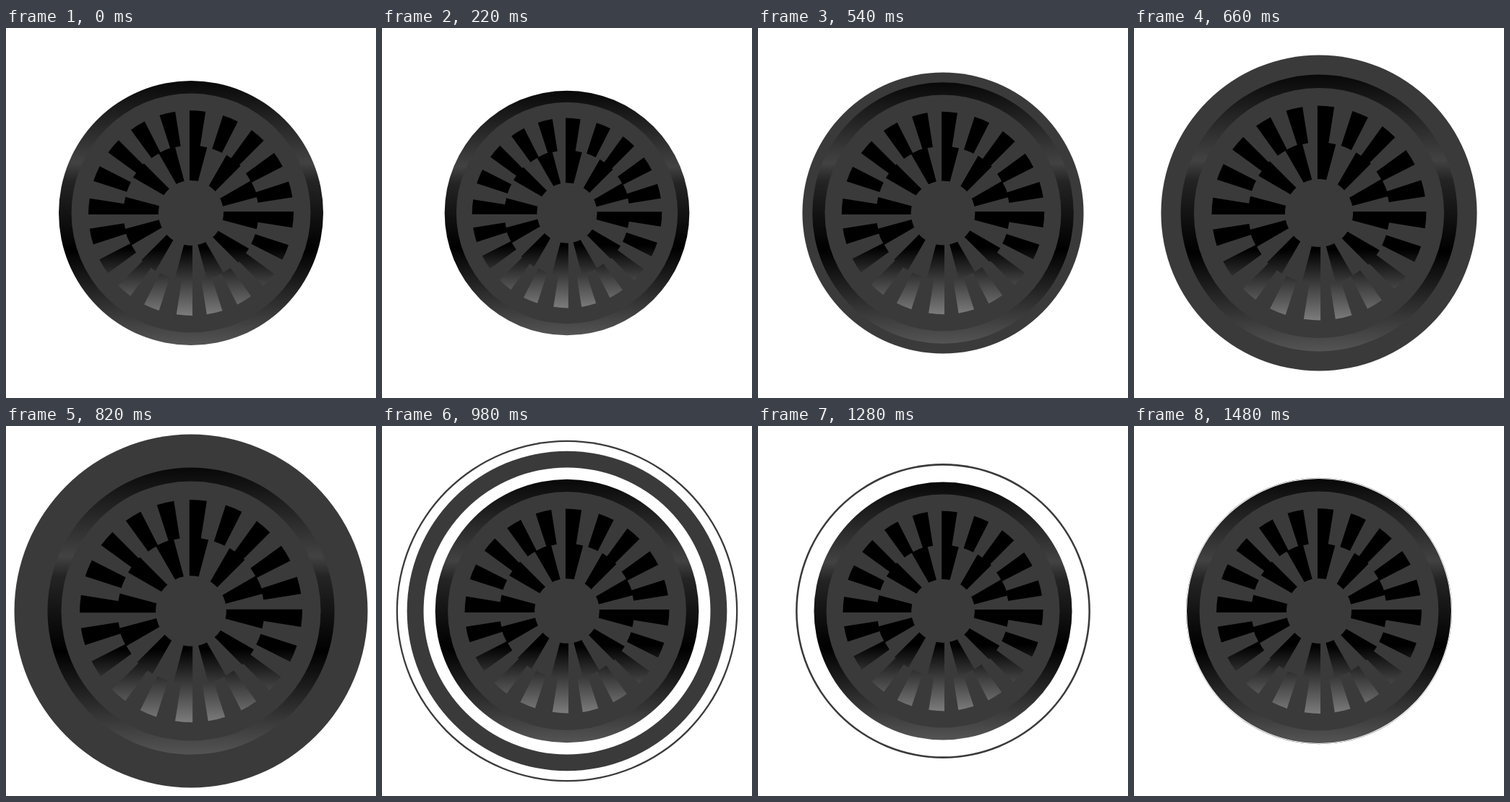
Animation of 512 by 512 pixels, one loop 1.5 s. Source, as an HTML page with a canvas:

```html
<!DOCTYPE html>
<html>
<head>
<meta charset="utf-8">
<style>
  html, body { margin: 0; height: 100%; overflow: hidden; background: #fff; }
  canvas { display: block; }
</style>
</head>
<body>
<canvas id="stage" width="512" height="512"></canvas>
<script>
const ctx = document.getElementById('stage').getContext('2d');
const LOOP = 1500, RADIUS = 183, GREY = '#3a3a3a', TURN = Math.PI * 2;

const mix = (a, b, p) => a + (b - a) * p;
const smooth = (t, from, to) => {
  const p = Math.min(1, Math.max(0, (t - from) / (to - from)));
  return p * p * (3 - 2 * p);
};

// Shrink, swell, shrink again, settle
function wheelScale(t) {
  if (t < 300) return mix(1, .91, smooth(t, 0, 300));
  if (t < 820) return mix(.91, 1.085, smooth(t, 300, 820));
  if (t < 1080) return mix(1.085, .954, smooth(t, 820, 1080));
  return mix(.954, 1, smooth(t, 1080, LOOP));
}

// Grey levels down a disc, keyed by their share of its height
function verticalGradient(reach, levels) {
  const gradient = ctx.createLinearGradient(0, -reach, 0, reach);
  for (const at in levels) {
    const v = levels[at];
    gradient.addColorStop(+at, `rgb(${v},${v},${v})`);
  }
  return gradient;
}

const rimFill = verticalGradient(RADIUS, { 0: 8, .31: 66, .38: 36, .64: 0, 1: 84 });
const slotFill = verticalGradient(142, { .67: 0, 1: 124 });

function disc(radius, fill) {
  ctx.fillStyle = fill;
  ctx.beginPath();
  ctx.arc(0, 0, radius, 0, TURN);
  ctx.fill();
}

// Evenly spaced slots, each filling half its period and nudged sideways
function addSlots(path, count, inner, outer, nudge) {
  const step = TURN / count;
  for (let i = 0; i < count; i++) {
    const start = i * step - Math.PI / 2, end = start + step / 2;
    const shift = i % (count / 4) ? nudge : -2;
    const x = -Math.sin(start) * shift, y = Math.cos(start) * shift;
    const slot = new Path2D();
    slot.arc(x, y, outer, start, end);
    slot.arc(x, y, inner, end, start, true);
    slot.closePath();
    path.addPath(slot);
  }
}

const slots = new Path2D();
addSlots(slots, 20, 93.5, 142, .4);
addSlots(slots, 12, 44, 94, 2.5);

function drawRipple(t) {
  const spread = t < 1090
    ? 57 * smooth(t, 280, 1090)
    : 57 * ((LOOP - t) / (LOOP - 1090)) ** 1.25;
  const open = smooth(t, 900, 1080);
  if (spread > 0) disc(RADIUS + spread, GREY);
  if (!open) return;
  disc(RADIUS + spread * (1 - .1 * open), '#fff');
  const bandInner = 38 * open, bandOuter = mix(48.5, 26.5, open);
  if (bandOuter > bandInner) {
    disc(RADIUS + bandOuter, GREY);
    disc(RADIUS + bandInner, '#fff');
  }
}

function drawWheel() {
  disc(RADIUS, rimFill);
  disc(165.5, GREY);
  ctx.fillStyle = slotFill;
  ctx.fill(slots);
  disc(45, GREY);
}

function draw(t) {
  const scale = wheelScale(t);
  ctx.setTransform(1, 0, 0, 1, 0, 0);
  ctx.fillStyle = '#fff';
  ctx.fillRect(0, 0, 512, 512);
  ctx.setTransform(scale, 0, 0, scale, 256, 256);
  drawRipple(t);
  drawWheel();
}

const begin = performance.now();
function tick() {
  draw((performance.now() - begin) % LOOP);
  requestAnimationFrame(tick);
}
tick();
</script>
</body>
</html>
```
